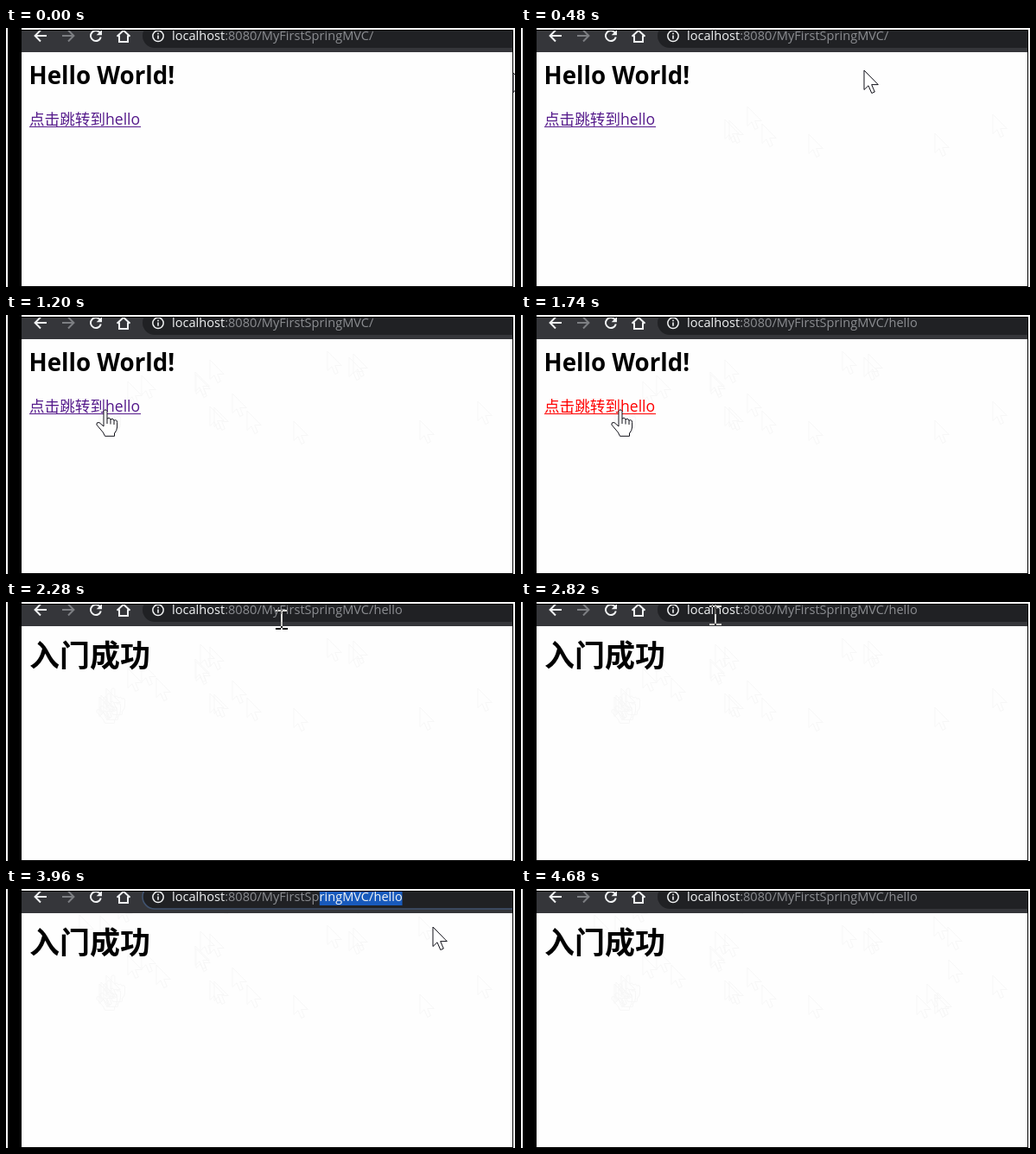
An HTML page with a canvas for the animation above (5.28 s loop, 589 px wide and 300 px high).

```html
<!DOCTYPE html>
<html lang="zh">
<head>
<meta charset="utf-8">
<style>
  html, body { margin: 0; width: 100%; height: 100%; overflow: hidden; background: #fff; }
  canvas { display: block; }
</style>
</head>
<body>
<canvas id="stage" width="589" height="300"></canvas>
<script>
const ctx = document.getElementById('stage').getContext('2d');
const LOOP = 5280, STEP = 60;
const FAMILY = '"Open Sans", "Noto Sans CJK SC", "Noto Sans CJK", sans-serif';
const HOST = 'localhost', PATH = ':8080/MyFirstSpringMVC/', PAGE = 'hello';
const URL_X = 192, URL_Y = 14, URL_FONT = '14.6px ' + FAMILY;

const ARROW = new Path2D('M0 0V22.5L5 17.8L8.8 26.5L12.3 25L8.7 16.6H16.3Z');
const HAND = new Path2D('M9 20V2.5Q11 -1 13 2.5V11Q15.5 8.5 17 12Q20 9.8 21 13.2Q24.5 11.5 24.6 15.5' +
  'V21Q24.3 25 21.5 28V31.3H10.5Q9 27 5 23L.8 18Q.5 14.8 4 15.6Z');
const KNUCKLES = new Path2D('M13 11V17M17 12V17.5M21 13.2V18');

// Pointer positions, one per step from each start time; the last one holds.
const moves = [
  { start: 0, points: [[587, 52], [546, 100], [479, 122], [333, 123], [279, 111], [241, 107],
    [236, 106], [262, 91], [397, 49], [402, 45]] },
  { start: 600, points: [[372, 42], [236, 52], [219, 66], [220, 69], [157, 70], [141, 77],
    [116, 100], [110, 108], [108, 110], [108, 105, 'hand'], [104, 109, 'hand']] },
  { start: 2100, points: [[113, 99, 'hand'], [174, 88], [225, 49], [319, 20, 'beam'], [372, 19, 'beam'],
    [410, 19, 'beam'], [430, 19, 'beam'], [438, 19, 'beam'], [440, 19, 'beam']] },
  { start: 2760, points: [[400, 17, 'beam'], [225, 15, 'beam'], [109, 31], [85, 30], [130, 12],
    [245, 3], [330, 0], [385, 0], [398, 2], [385, 12, 'beam'], [367, 12, 'beam']] },
  { start: 3660, points: [[368, 12, 'beam'], [385, 13, 'beam'], [420, 17, 'beam'], [452, 21, 'beam'],
    [478, 32], [494, 44], [495, 82], [470, 110], [458, 123]] },
  { start: 4440, points: [[482, 120], [530, 135], [575, 130], [600, 128]] }
];
const track = moves.flatMap(({ start, points }) =>
  points.map(([x, y, kind = 'arrow'], i) => ({ time: start + i * STEP, x, y, kind })));

function rect(color, x, y, w, h) {
  ctx.fillStyle = color;
  ctx.fillRect(x, y, w, h);
}

function text(str, x, y, font, color) {
  ctx.font = font;
  ctx.fillStyle = color;
  ctx.fillText(str, x, y);
}

function widthOf(str) {
  ctx.font = URL_FONT;
  return ctx.measureText(str).width;
}

function stroke(path, color, width = 1) {
  ctx.strokeStyle = color;
  ctx.lineWidth = width;
  ctx.stroke(path);
}

function clipped(x, y, w, h, draw) {
  ctx.save();
  ctx.beginPath();
  ctx.rect(x, y, w, h);
  ctx.clip();
  draw();
  ctx.restore();
}

function drawIcons() {
  const light = '#f1f3f4';
  stroke(new Path2D('M47 9H34M40 2.5L33.6 9L40 15.5'), light, 2);
  stroke(new Path2D('M65 9H78M72 2.5L78.4 9L72 15.5'), '#7d7f83', 2);
  stroke(new Path2D('M108.6 5.2A6 6 0 1 0 109.8 10.6'), light, 2);
  ctx.fillStyle = light;
  ctx.fill(new Path2D('M111 2V8.3H104.7Z'));
  stroke(new Path2D('M128.5 9.8L136 2.8L143.5 9.8M131 8.5V16H141V8.5'), light, 2);
  const ring = new Path2D();
  ring.arc(176, 9.3, 6.2, 0, Math.PI * 2);
  stroke(ring, light, 1.5);
  rect(light, 175.2, 8.5, 1.6, 4.2);
  rect(light, 175.2, 5.6, 1.6, 1.7);
}

function drawSelection(full, pointerX) {
  const from = full.indexOf('ring');
  let to = from;
  while (to < full.length && URL_X + widthOf(full.slice(0, to + 1)) <= pointerX + 3) to++;
  if (to === from) return;
  const x = URL_X + widthOf(full.slice(0, from));
  const w = widthOf(full.slice(from, to));
  clipped(x, 3, w, 16, () => {
    rect('#185abc', x, 3, w, 16);
    text(full.slice(from, to), x, URL_Y, URL_FONT, '#f1f3f4');
  });
}

function drawToolbar(t, pointer) {
  rect('#35363a', 18, 3, 568, 25);
  const field = new Path2D();
  field.roundRect(158, -5, 460, 28, 14);
  ctx.fillStyle = '#202124';
  ctx.fill(field);
  const focused = t >= 3660 && t < 4200;
  if (focused) stroke(field, '#40536f', 1.6);
  drawIcons();
  const path = PATH + (t >= 1740 ? PAGE : '');
  text(HOST, URL_X, URL_Y, URL_FONT, '#f1f3f4');
  text(path, URL_X + widthOf(HOST), URL_Y, URL_FONT, '#8b8d91');
  if (focused && t >= 3720) drawSelection(HOST + path, t >= 3900 ? 589 : pointer.x);
}

function drawTrail(t) {
  track.forEach((p, i) => {
    const next = track[i + 1];
    if (!next || next.time > t || p.time >= 4500 || p.kind === 'beam' || p.x > 580) return;
    ctx.save();
    ctx.translate(p.x, p.y);
    stroke(p.kind === 'hand' ? HAND : ARROW, '#f7f7f7');
    ctx.restore();
  });
}

function drawPage(t) {
  rect('#fefefe', 18, 28, 568, 271);
  drawTrail(t);
  if (t >= 1800) {
    text('入门成功', 27, 75, 'bold 35px ' + FAMILY, '#000');
    return;
  }
  text('Hello World!', 26.5, 65, 'bold 27.7px ' + FAMILY, '#000');
  const color = t >= 1680 ? '#f00' : '#551a8b';
  text('点击跳转到hello', 27, 112, '17.6px ' + FAMILY, color);
  rect(color, 27, 114, 129, 1);
}

function drawPointer({ x, y, kind }) {
  ctx.save();
  ctx.translate(x, y);
  if (kind === 'beam') {
    ctx.globalCompositeOperation = 'difference';
    rect('#fff', -1, -10, 2, 20);
    for (const edge of [-11, 10]) {
      rect('#fff', -7, edge, 6, 2);
      rect('#fff', 1, edge, 6, 2);
    }
  } else {
    const shape = kind === 'hand' ? HAND : ARROW;
    ctx.fillStyle = '#fff';
    ctx.fill(shape);
    stroke(shape, '#101018');
    if (kind === 'hand') stroke(KNUCKLES, '#101018');
  }
  ctx.restore();
}

function draw(t) {
  const pointer = track.findLast(p => p.time <= t);
  rect('#fff', 0, 0, 589, 300);
  rect('#000', 2, 0, 16, 300);
  rect('#000', 18, 2, 569, 298);
  clipped(18, 28, 568, 271, () => drawPage(t));
  clipped(18, 3, 568, 25, () => drawToolbar(t, pointer));
  drawPointer(pointer);
}

const begin = performance.now();
function tick() {
  draw((performance.now() - begin) % LOOP);
  requestAnimationFrame(tick);
}
tick();
</script>
</body>
</html>
```
